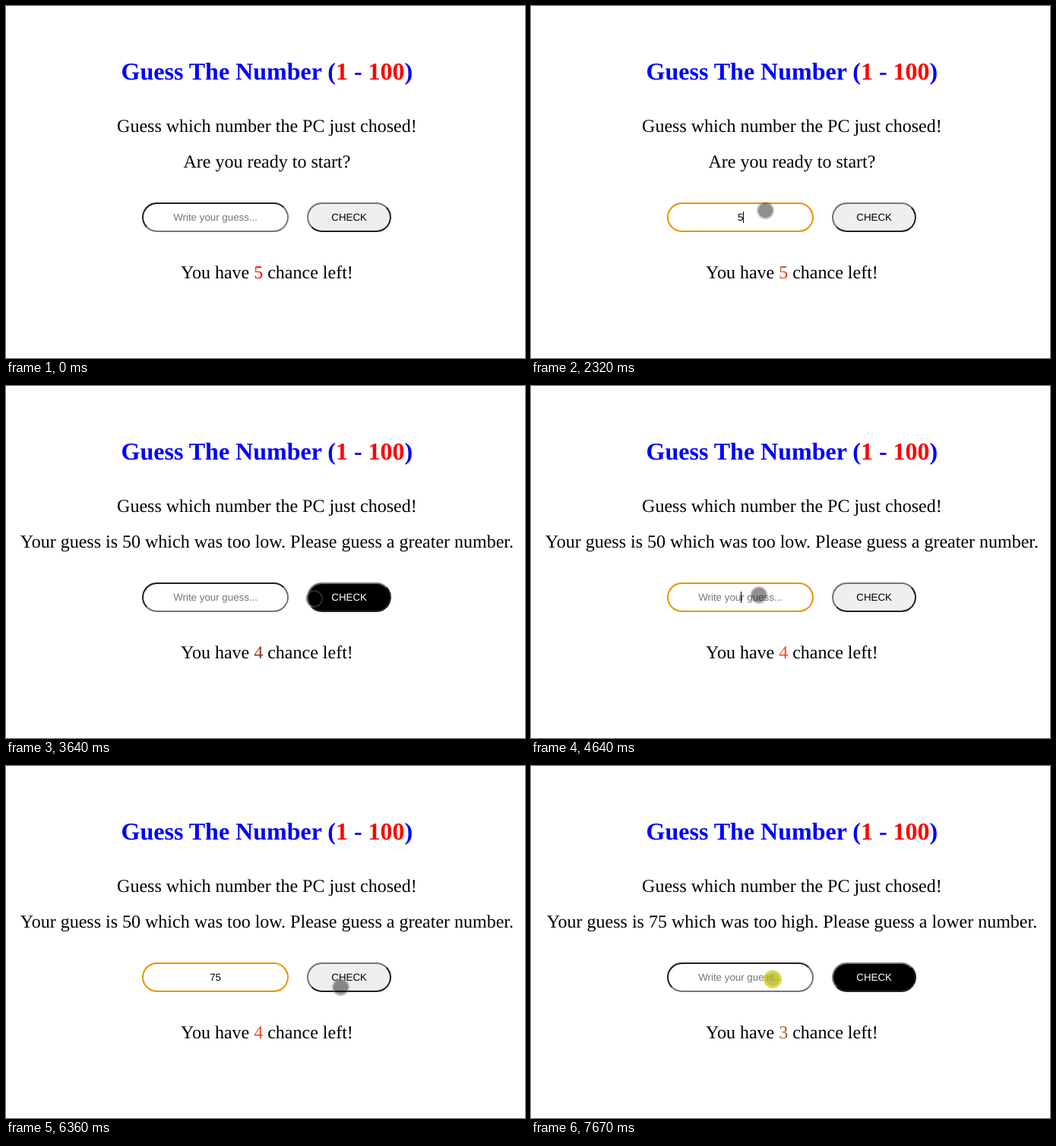
An HTML page that plays this animation: 683 by 464 pixels, repeating every 8 s.

```html
<!DOCTYPE html>
<html lang="en">
<head>
<meta charset="utf-8">
<title>Guess The Number</title>
<style>
  html, body { margin: 0; width: 100%; height: 100%; overflow: hidden; background: #fff; }
  svg { display: block; width: 100%; height: 100%; }
  text { text-anchor: middle; text-rendering: geometricPrecision; }
  .serif { font: 24px "Liberation Serif", "Times New Roman", serif; }
  .title { font-size: 32px; font-weight: bold; fill: #00f; }
  .title tspan { fill: #f00; }
  .sans { font: 13.333px "Liberation Sans", Arial, sans-serif; }
  .edge { fill: none; stroke-width: 2; }
</style>
</head>
<body>
<svg viewBox="0 0 683 464">
  <text class="serif title" x="343.4" y="97">Guess The Number (<tspan>1</tspan> - <tspan>100</tspan>)</text>
  <text class="serif" x="343.4" y="166">Guess which number the PC just chosed!</text>
  <text class="serif" x="343.4" y="213" id="message"></text>
  <g id="field"></g>
  <text class="sans" x="275.6" y="283" id="entry"></text>
  <rect id="caret" y="271" width="1" height="15"/>
  <g id="button"></g>
  <text class="sans" x="451.7" y="283" id="label">CHECK</text>
  <text class="serif" x="343.4" y="359">You have <tspan id="chances"></tspan> chance left!</text>
  <g id="pointer">
    <g id="idle">
      <circle r="9.7" fill="#000" fill-opacity=".44"/>
      <circle r="10.5" fill="none" stroke="#6e6e6e" stroke-opacity=".38" stroke-width="2"/>
    </g>
    <g id="pressed">
      <circle r="12" fill="#c8c600" fill-opacity=".65"/>
      <circle r="9" fill="#786e00" fill-opacity=".2"/>
    </g>
  </g>
</svg>
<script>
const LOOP = 8000;
const LIGHT = "#76767a", DARK = "#212125", FOCUS = "#e59700";
const el = id => document.getElementById(id);
const show = (id, on) => el(id).setAttribute("visibility", on ? "visible" : "hidden");

// A pill whose top-left and bottom-right edges have their own colours.
function makePill(id, left, width) {
  const x = left + 1, y = 260, w = width - 2, h = 37, r = h / 2;
  const k = r * (1 - Math.SQRT1_2);
  const arc = (px, py) => `A${r} ${r} 0 0 1 ${px} ${py}`;
  const low = `${x + k} ${y + h - k}`, high = `${x + w - k} ${y + k}`;
  el(id).innerHTML =
    `<rect x="${x}" y="${y}" width="${w}" height="${h}" rx="${r}"/>` +
    `<path class="edge" d="M${low}${arc(x + r, y)}H${x + w - r}${arc(x + w - k, y + k)}"/>` +
    `<path class="edge" d="M${high}${arc(x + w - r, y + h)}H${x + r}${arc(x + k, y + h - k)}"/>`;
}

function paintPill(id, fill, topLeft, bottomRight) {
  const [body, upper, lower] = el(id).children;
  body.setAttribute("fill", fill);
  upper.setAttribute("stroke", topLeft);
  lower.setAttribute("stroke", bottomRight);
}

// Each step lists only what changes at its time (ms).
const steps = [
  [0, { message: "Are you ready to start?", value: "", chances: 5, tint: "#f00",
        at: null, press: false, focus: false, caret: false, active: false }],
  [660, { at: [537.5, 298.5] }],
  [990, { at: [344.5, 266.5] }],
  [1320, { at: [308.5, 269.5] }],
  [1650, { focus: true, caret: true, tint: "#c9420c" }],
  [1990, { caret: false }],
  [2320, { value: "5", caret: true }],
  [2650, { value: "50" }],
  [2980, { at: [425.5, 275.5] }],
  [3320, { at: [472.5, 280.5], caret: false }],
  [3640, { message: "Your guess is 50 which was too low. Please guess a greater number.",
           value: "", chances: 4, tint: "#8f3a14", at: [405.5, 280.5], focus: false, active: true }],
  [3980, { at: [302.5, 275.5] }],
  [4310, { at: [300, 275], press: true }],
  [4640, { at: [300, 275.5], press: false, focus: true, caret: true, active: false, tint: "#e8502c" }],
  [4970, { caret: false }],
  [5320, { value: "7", caret: true }],
  [5670, { value: "75", at: [314.5, 281.5] }],
  [5990, { at: [425.5, 292.5] }],
  [6360, { at: [440.5, 291.5], caret: false }],
  [6660, { message: "Your guess is 75 which was too high. Please guess a lower number.",
           value: "", chances: 3, tint: "#a0602a", focus: false, active: true }],
  [7010, { at: [375.5, 290.5] }],
  [7340, { at: [318.5, 281.5] }],
  [7670, { at: [318, 281], press: true }]
];

const stateAt = time =>
  Object.assign({}, ...steps.filter(([start]) => start <= time).map(([, change]) => change));

function render(time) {
  const s = stateAt(time);
  el("message").textContent = s.message;
  el("entry").textContent = s.value || "Write your guess...";
  el("entry").setAttribute("fill", s.value ? "#000" : "#757575");
  el("caret").setAttribute("x", 276 + 3 * s.value.length);
  show("caret", s.caret);
  paintPill("field", "#fff", s.focus ? FOCUS : DARK, s.focus ? FOCUS : LIGHT);
  paintPill("button", s.active ? "#000" : "#efefef", LIGHT, DARK);
  el("label").setAttribute("fill", s.active ? "#fff" : "#000");
  el("chances").textContent = s.chances;
  el("chances").setAttribute("fill", s.tint);
  show("idle", s.at && !s.press);
  show("pressed", s.at && s.press);
  if (s.at) el("pointer").setAttribute("transform", `translate(${s.at})`);
}

makePill("field", 179, 193);
makePill("button", 396, 111);

const begin = performance.now();
function tick() {
  render((performance.now() - begin) % LOOP);
  requestAnimationFrame(tick);
}
tick();
</script>
</body>
</html>
```
